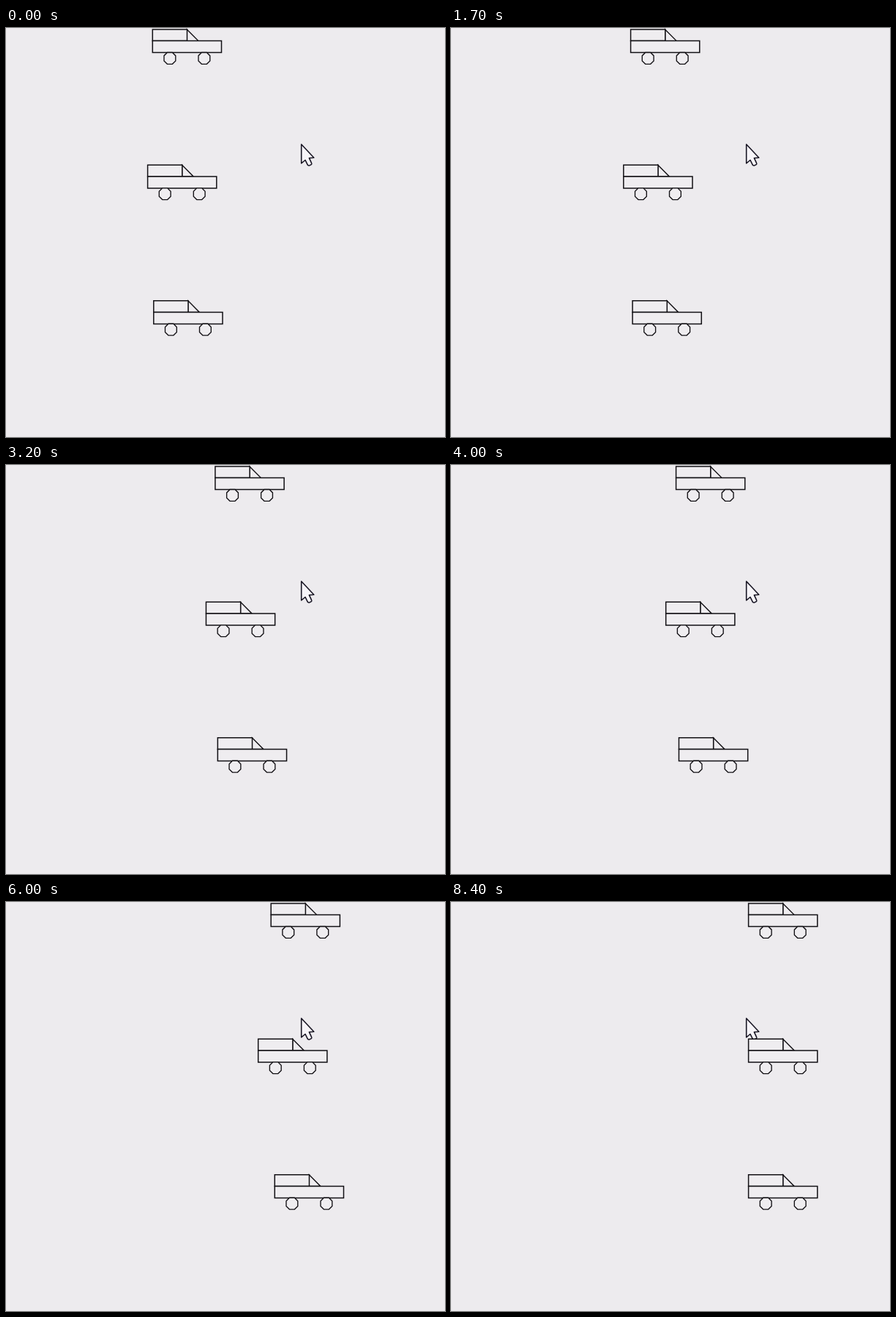
These frames come from a looping animation (600x559 px, 8800 ms). An HTML page:

```html
<!DOCTYPE html>
<html lang="en">
<head>
<meta charset="utf-8">
<title>Three cars</title>
<style>
  html, body { margin: 0; width: 100%; height: 100%; overflow: hidden; background: #edebee; }
  svg { display: block; width: 100%; height: 100%; }
  .car { fill: #efedf0; stroke: #121014; stroke-width: 1.5; }
  .thin { stroke-width: 1.35; }
  .pointer { fill: #f7f5f9; stroke: #191624; stroke-width: 1.6; stroke-linejoin: round; }
</style>
</head>
<body>
<svg viewBox="0 0 600 559">
  <defs>
    <path id="wheel" class="thin" d="M-3.5-7.9H3.5L7.9-3.5V3.5L3.5 7.9H-3.5L-7.9 3.5V-3.5Z"/>
    <g id="car">
      <path class="thin" d="M47 0L62.5 15.6H47Z"/>
      <path d="M0 0H47.2V15.6H0Z"/>
      <path d="M0 15.6H94.2V31.6H0Z"/>
      <use href="#wheel" x="23.6" y="39.4"/>
      <use href="#wheel" x="70.6" y="39.4"/>
    </g>
  </defs>
  <path class="pointer" d="M403.7 159V185L409 180.5L412.4 187.3Q413.4 188.4 415 187.7L417.2 186.6Q418.2 185.8 417.6 184.6L414.4 177.8L420.8 177.2Z"/>
  <use class="car" href="#car" y="2"/>
  <use class="car" href="#car" y="187.3"/>
  <use class="car" href="#car" y="372.8"/>
</svg>
<script>
const LOOP = 8800, STEP = 100;
const FINISH = 406.6, GAIN = 0.08; // px, px/s²
const cars = [...document.querySelectorAll('.car')];
const lanes = [
  { from: 200.3, speed: 26.5 },
  { from: 193.6, speed: 24.7 },
  { from: 201.8, speed: 27.1 }
];

// Nearly steady drive, in hard steps, up to the finish.
function draw(ms) {
  const t = Math.floor(ms % LOOP / STEP) * STEP / 1000;
  lanes.forEach(({ from, speed }, i) => {
    const x = Math.min(FINISH, from + speed * t + GAIN * t * t);
    cars[i].setAttribute('x', x.toFixed(2));
  });
}

const start = performance.now();
function tick() {
  draw(performance.now() - start);
  requestAnimationFrame(tick);
}
tick();
</script>
</body>
</html>
```
